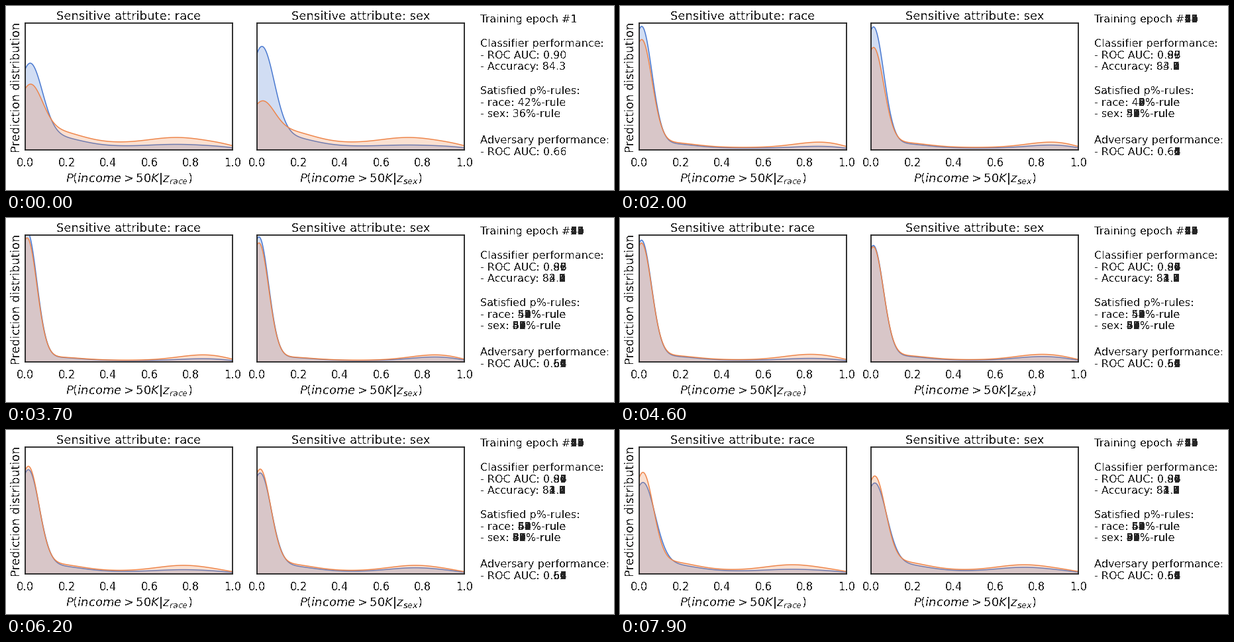
A matplotlib script for the animation above (8000 ms loop, 918x280 px).

```python
import numpy as np
import matplotlib.pyplot as plt
from matplotlib.animation import FuncAnimation

W, H, DPI = 918, 280, 72
FRAMES, STEP = 80, 100
INK = 0.15
BLUE, ORANGE = "#4878D0", "#EE854A"

plt.rcParams.update({
    "font.family": "DejaVu Sans", "mathtext.fontset": "dejavusans",
    "text.color": str(INK), "axes.labelcolor": str(INK),
    "xtick.color": str(INK), "axes.edgecolor": str(INK),
    "axes.linewidth": 1.875, "axes.titlesize": 18, "axes.titlepad": 5,
    "axes.labelsize": 18, "axes.labelpad": 4, "xtick.labelsize": 16.5,
    "xtick.major.size": 9, "xtick.major.pad": 2.5, "xtick.bottom": False,
})

xs = np.linspace(-0.05, 1.05, 400)
edge = 1 / (1 + np.exp((xs - 1.01) / 0.04))


def bell(mid, width):
    return np.exp(-((xs - mid) / width) ** 2 / 2)


def squeeze(t):
    """How strongly predictions crowd at zero, 0 to 1."""
    return np.interp(t, [0, 11, 20, 37, 55, 68, 79],
                     [0, .18, .8, 1, .73, .46, .4])


def density(name, color, t):
    q = squeeze(t)
    race, blue = name == "race", color == BLUE
    mean = 116 + 74 * q + (4 if race else -4) * q
    gap = 32 - .6 * t if race else 99 * np.exp(-t / 27) - 16
    side = 1 if blue else -1

    peak = mean + side * gap / 2
    width = (.060 - .013 * q) * (1 - side * .7 * min(gap, 0) / mean)
    if blue:
        tail, base = 15 - 10 * q, 5.5 - 3.5 * q
        bump = 3 if race else 6 - 4 * np.exp(-t / 15)
    else:
        tail, base = 19 - 14 * q, 7.5 - 5 * q + 3 * np.exp(-t / 8)
        bump = 8.5
    bump_x = np.interp(t, [0, 11, 37, 68], [.73, .89, .87, .74])

    top = peak - .71 * tail - base
    return (top * bell(.022 - .013 * q, width) + tail * bell(.13, .13)
            + edge * (base + bump * bell(bump_x, .13)))


def outline(name, color, t):
    pts = np.column_stack([xs, density(name, color, t)])
    return np.vstack([[xs[0], -20], pts, [xs[-1], -20]])


def harden(img, dpi):
    """One-bit lettering: each pixel is either ink or clear."""
    out = np.full(img.shape, INK)
    out[..., 3] = img[..., 3] >= 0.5
    return out, 0, 0


def blocks(t):
    """The four text blocks at step t."""
    auc = max(.84, .90 - .0013 * t)
    acc = max(81.4, 84.3 - .05 * t) + .35 * np.sin(5 * t)
    race = 45.4 - 3.4 * np.cos(1.7 * t) + .3 * max(0, t - 20)
    sex = min(96, 36 + .85 * t) + 1.5 * np.sin(2.3 * t)
    adv = max(.53, .66 - .003 * t)
    return [
        f"Training epoch #{t + 1}",
        f"Classifier performance:\n- ROC AUC: {auc:.2f}\n- Accuracy: {acc:.1f}",
        f"Satisfied p%-rules:\n- race: {race:.0f}%-rule\n- sex: {sex:.0f}%-rule",
        f"Adversary performance:\n- ROC AUC: {adv:.2f}",
    ]


fig = plt.figure(figsize=(W / DPI, H / DPI), dpi=DPI, facecolor="white")
curves = []


def panel(left, name):
    ticks = np.linspace(0, 1, 6)
    ax = fig.add_axes([left / W, 61 / H, 313 / W, 193 / H])
    ax.set(xlim=(0, 1), ylim=(0, 193), yticks=[], xticks=ticks)
    ax.set_xticklabels([f"{v:.1f}" for v in ticks])
    ax.set_title(f"Sensitive attribute: {name}")
    ax.set_xlabel(rf"$P(income>50K|z_{{{name}}})$", labelpad=3.3)
    for color in (BLUE, ORANGE):
        poly, = ax.fill(*outline(name, color, 0).T,
                        fc=(color, .25), ec=color, lw=1.5)
        curves.append((poly, name, color))
    for text in [ax.title, ax.xaxis.label, ax.yaxis.label,
                 *ax.get_xticklabels()]:
        text.set_agg_filter(harden)
    return ax


panel(29, "race").set_ylabel("Prediction distribution", y=.5 - 1 / 193)
panel(379, "sex")

# Lettering piles up: a block is kept once it brings a glyph not yet printed.
printed = []
seen = [set() for _ in range(4)]
for t in range(FRAMES):
    for known, y, text in zip(seen, [.9, .65, .4, .2], blocks(t)):
        glyphs = set(enumerate(text))
        if not glyphs <= known:
            known |= glyphs
            label = fig.text(716 / W, (288 * y - 4.4) / H, text, fontsize=16)
            label.set_agg_filter(harden)
            printed.append((t, label))


def update(t):
    for poly, name, color in curves:
        poly.set_xy(outline(name, color, t))
    for start, label in printed:
        label.set_visible(start <= t)
    return []


anim = FuncAnimation(fig, update, frames=FRAMES, interval=STEP,
                     repeat=True, repeat_delay=0, blit=False)
plt.show()
```
